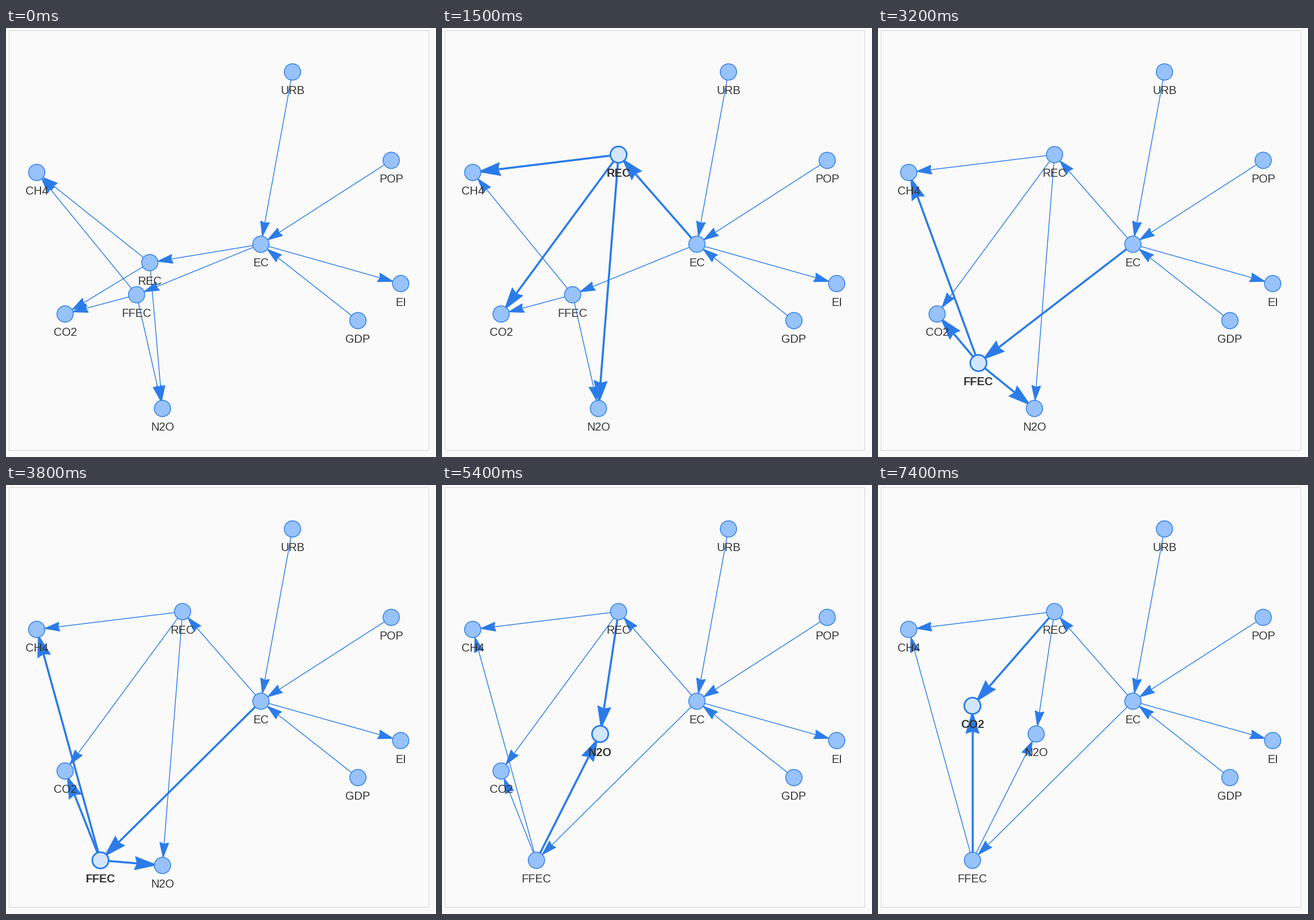
Write a matplotlib script that moves like this. It is 749 by 747 pixels and loops after 8000 ms.

```python
import numpy as np
import matplotlib.pyplot as plt
from matplotlib.animation import FuncAnimation
from matplotlib.patches import Circle, Polygon, Rectangle

W, H, DPI = 749, 747, 64
PT = 72 / DPI          # points per pixel
STEP, LOOP = 100, 8000
ZOOM = 1.42            # view scale of the graph
RADIUS = 10 * ZOOM

PAPER, FRAME, INK = "#fafafa", "#d3d3d3", "#343434"
BLUE, FILL, FILL_ON = "#2b7ce9", "#97c2fc", "#d2e5ff"

HOME = {
    "URB": (498.5, 76), "POP": (670.5, 230), "GDP": (612.5, 509),
    "EC": (443.5, 376), "EI": (687, 444.5), "REC": (250, 408),
    "FFEC": (227, 464), "CH4": (53, 251), "CO2": (102.5, 497.5),
    "N2O": (272, 662),
}
# Energy use links its drivers to the fuels, and each fuel to every gas.
LINKS = ([(a, "EC") for a in ("URB", "POP", "GDP")]
         + [("EC", b) for b in ("EI", "REC", "FFEC")]
         + [(a, b) for a in ("REC", "FFEC") for b in ("CH4", "CO2", "N2O")])


class Drag:
    """Pulls a node to a new place, slowing down along a bent path."""

    def __init__(self, name, start, span, end, bend=0.5, power=2):
        self.name, self.start, self.span = name, start, span
        self.end, self.bend, self.power = end, bend, power

    def place(self, t):
        u = min((t - self.start) / self.span, 1)
        e = 1 - (1 - u) ** self.power
        (x0, y0), (x1, y1) = HOME[self.name], self.end
        ex = 2 * e * (1 - e) * self.bend + e * e
        return x0 + (x1 - x0) * ex, y0 + (y1 - y0) * e


DRAGS = [
    Drag("REC", 500, 1000, (307, 220), bend=-0.07, power=2.14),
    Drag("FFEC", 2800, 1000, (164, 653), bend=0.94, power=1.94),
    Drag("N2O", 4800, 600, (275, 433)),
    Drag("CO2", 6600, 800, (164, 384)),
]

fig = plt.figure(figsize=(W / DPI, H / DPI), dpi=DPI, facecolor=PAPER)
ax = fig.add_axes([0, 0, 1, 1])
# Whole numbers are pixel centres.
ax.set_xlim(-0.5, W - 0.5)
ax.set_ylim(H - 0.5, -0.5)
ax.axis("off")
ax.add_patch(Rectangle((4, 3), 731, 731, fill=False, ec=FRAME, lw=PT))


class Link:
    def __init__(self, a, b):
        self.ends = a, b
        self.line, = ax.plot([], [], color=BLUE, solid_capstyle="butt", zorder=2)
        self.head = Polygon(np.zeros((4, 2)), fc=BLUE, ec=BLUE,
                            joinstyle="miter", zorder=2)
        ax.add_patch(self.head)

    def update(self, pos, active):
        width = 2.5 if active in self.ends else 1
        size = (15 + 3 * width) * ZOOM
        start, end = (np.array(pos[n]) for n in self.ends)
        along = (end - start) / np.hypot(*(end - start))
        side = np.array([-along[1], along[0]])
        tip = end - RADIUS * along
        back, notch = tip - size * along, tip - 0.9 * size * along
        wing = 0.3 * size * side
        self.line.set_data(*zip(start, notch))
        self.head.set_xy([tip, back + wing, notch, back - wing])
        for part in (self.line, self.head):
            part.set_linewidth(width * ZOOM * PT)


class Node:
    def __init__(self, name, z):
        self.name = name
        self.dot = Circle((0, 0), RADIUS, ec=BLUE, zorder=z)
        ax.add_patch(self.dot)
        self.label = ax.text(0, 0, name, color=INK, family="Liberation Sans",
                             size=14 * ZOOM * PT, ha="center", va="baseline",
                             zorder=z)

    def update(self, pos, active):
        x, y = pos[self.name]
        on = self.name == active
        self.dot.center = x, y
        self.dot.set_facecolor(FILL_ON if on else FILL)
        self.dot.set_linewidth((2 if on else 1) * ZOOM * PT)
        self.label.set_position((x, y + 38.5))
        self.label.set_fontweight("bold" if on else "normal")


items = [Link(a, b) for a, b in LINKS]
items += [Node(name, 3 + i) for i, name in enumerate(HOME)]


def draw(i):
    t = i * STEP
    pos, active = dict(HOME), None
    for drag in DRAGS:
        if t >= drag.start:
            pos[drag.name] = drag.place(t)
            active = drag.name
    for item in items:
        item.update(pos, active)
    return []


anim = FuncAnimation(fig, draw, frames=LOOP // STEP, interval=STEP,
                     init_func=lambda: draw(0), repeat=True, repeat_delay=0)
plt.show()
```
